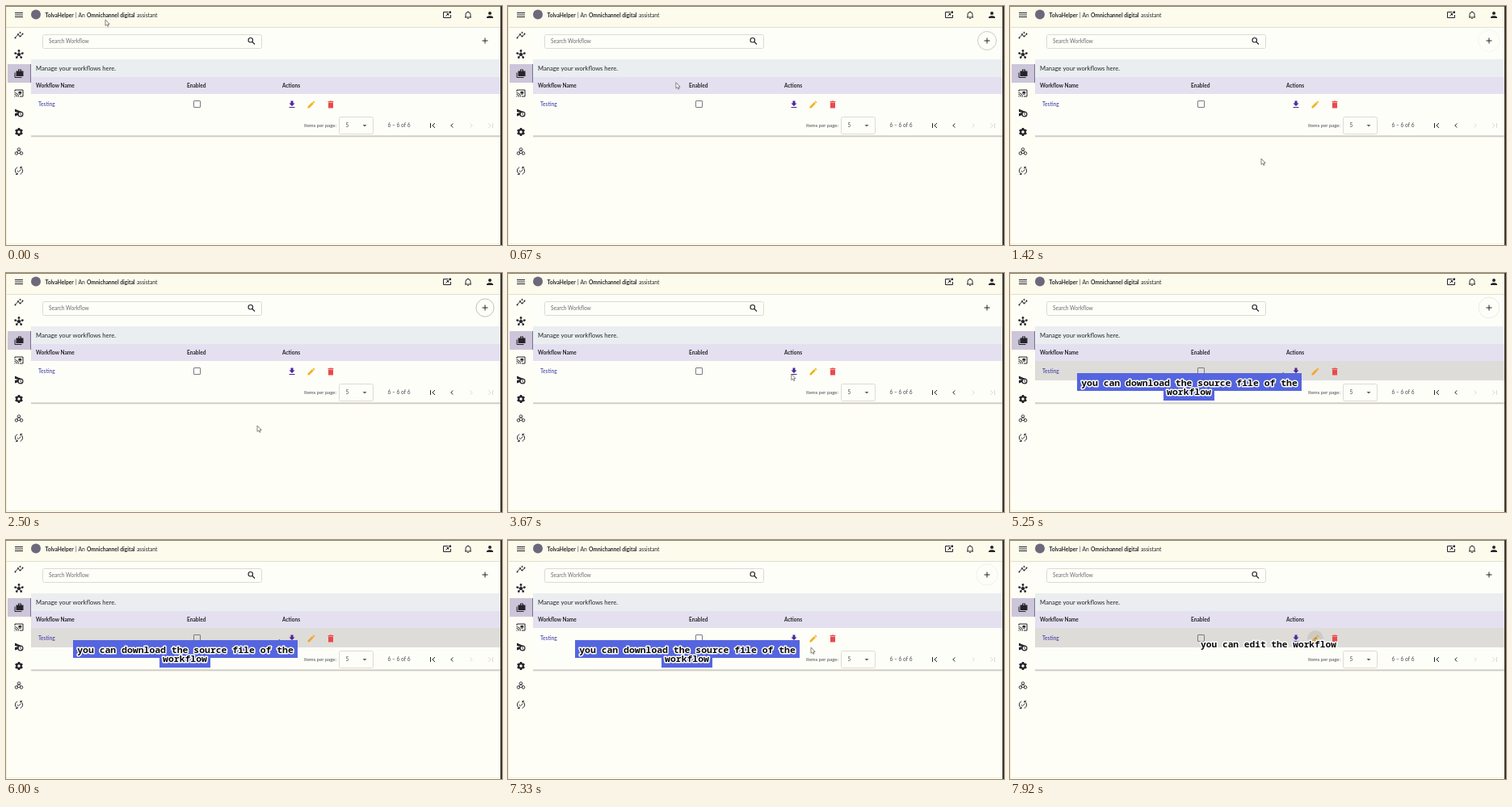
Animation, 614 px wide and 296 px high, one loop 8 s. Source, as an HTML page with a canvas:

```html
<!DOCTYPE html>
<html lang="en">
<head>
<meta charset="utf-8">
<title>Workflow list</title>
<style>
html, body { margin: 0; width: 100%; height: 100%; overflow: hidden; background: #fefef6; }
canvas { display: block; width: 614px; height: 296px; }
</style>
</head>
<body>
<canvas id="stage" width="614" height="296"></canvas>
<script>
const g = document.getElementById('stage').getContext('2d');
const LOOP = 8000;
const UI = 'Lato, sans-serif';
const MONO = '"Noto Sans Mono", "DejaVu Sans Mono", monospace';
const INK = '#25242a';
const EDGE = '#dcdad2';
const PAGE = '#fefef6';

function box(x, y, w, h, color) {
  g.fillStyle = color;
  g.fillRect(x, y, w, h);
}

function frame(x, y, w, h, color, r = 2) {
  g.strokeStyle = color;
  g.lineWidth = 1;
  g.beginPath();
  g.roundRect(x + 0.5, y + 0.5, w, h, r);
  g.stroke();
}

function label(str, x, y, size, color = INK, weight = 400) {
  g.font = `${weight} ${size}px ${UI}`;
  g.fillStyle = color;
  g.fillText(str, x, y);
}

// Icons live on a 24-unit grid centred on (x, y) and are 12px wide by default.
function icon(x, y, { fill, line, width = 2, color = INK, scale = 0.5 }) {
  g.save();
  g.translate(x - 12 * scale, y - 12 * scale);
  g.scale(scale, scale);
  g.fillStyle = g.strokeStyle = color;
  g.lineWidth = width;
  if (line) g.stroke(new Path2D(line));
  if (fill) g.fill(new Path2D(fill), 'evenodd');
  g.restore();
}

function dot(x, y, r, color = INK) {
  g.fillStyle = color;
  g.beginPath();
  g.arc(x, y, r, 0, Math.PI * 2);
  g.fill();
}

function ring(x, y, r, color = INK, width = 1, from = 0, to = Math.PI * 2) {
  g.strokeStyle = color;
  g.lineWidth = width;
  g.beginPath();
  g.arc(x, y, r, from, to);
  g.stroke();
}

function spokes(x, y, n, r, tip, turn) {
  for (let i = 0; i < n; i++) {
    const a = turn + i * Math.PI * 2 / n;
    const px = x + r * Math.cos(a), py = y + r * Math.sin(a);
    g.strokeStyle = INK;
    g.lineWidth = 0.9;
    g.beginPath();
    g.moveTo(x, y);
    g.lineTo(px, py);
    g.stroke();
    dot(px, py, tip);
  }
}

function gear(x, y) {
  g.strokeStyle = INK;
  g.lineWidth = 2.4;
  for (let i = 0; i < 3; i++) {
    const a = Math.PI / 2 + i * Math.PI / 3;
    const dx = 5 * Math.cos(a), dy = 5 * Math.sin(a);
    g.beginPath();
    g.moveTo(x - dx, y - dy);
    g.lineTo(x + dx, y + dy);
    g.stroke();
  }
  dot(x, y, 3.9);
  dot(x, y, 1.7, PAGE);
}

function sidebar() {
  box(2, 72, 29, 23, '#cdc6da');
  box(30, 72, 1, 23, '#77738a');

  icon(16, 36, { line: 'M3 18L10 11L15 16L21 10', fill: 'M15 3l1 2 2 1-2 1-1 2-1-2-2-1 2-1z' });
  for (const [x, y] of [[11.5, 39.6], [15, 35.1], [17.5, 37.6], [20.5, 34.6]]) dot(x, y, 1);

  spokes(16, 60, 5, 4.6, 1.35, -Math.PI / 2);
  dot(16, 60, 2.1);

  icon(16, 84, {
    fill: 'M5 5h5V1h8v4h5v13H5zM12 3v2h4V3z',
    line: 'M2 9v12h17'
  });

  icon(16, 108, {
    line: 'M2 8V4h20v16h-8M1 15a6 6 0 0 1 6 6M1 11a10 10 0 0 1 10 10',
    fill: 'M9 10l5.5-3 5.5 3-5.5 3zM11 12l3.5 2 3.5-2v2l-3.5 2-3.5-2zM1 18v3h3z'
  });

  icon(16, 132, { fill: 'M2 3l16 7-7 8-9 3v-7l9-2-9-2z' });
  dot(18, 134, 3.5);
  dot(18, 134, 2.3, PAGE);
  icon(16, 132, { line: 'M16 12v5l3 2', width: 1.6 });

  gear(16, 156);

  for (const [x, y] of [[16, 177.6], [13, 182.4], [19, 182.4]]) ring(x, y, 1.8, INK, 0.9);
  icon(16, 180, { line: 'M12 8l4 7M11 9l-4 7M8 17h8', width: 1.3 });

  ring(16, 204, 4.6, INK, 1, -0.7, 1.2);
  ring(16, 204, 4.6, INK, 1, 2.4, 4.3);
  icon(16, 204, {
    line: 'M8 12l3 3 6-6',
    fill: 'M15 2h6l-6 6zM9 22H3l6-6z',
    width: 1.8
  });
}

function header() {
  box(0, 0, 614, 27, '#fcfbec');
  box(0, 26, 614, 1, '#e2e0d0');
  icon(16, 11, { line: 'M2 7H22M2 12H22M2 17H22' });
  dot(37, 10.5, 6, '#6d697c');

  label('TolvaHelper', 48.5, 13.5, 6.6, INK, 700);
  label('| An', 86, 13.5, 6.7);
  label('Omnichannel digital', 100, 13.5, 6.7, INK, 700);
  label('assistant', 162, 13.5, 6.7);

  icon(546, 11, {
    line: 'M15 5H3V19H21V12M9 15l5-5',
    fill: 'M10 8h6v6zM17 3h5v5h-5z'
  });
  icon(572, 11, {
    line: 'M4 18H20M6 18V11a6 6 0 0 1 12 0v7M12 3v3',
    fill: 'M10 20h4a2 2 0 0 1-4 0z'
  });
  icon(599, 11, { fill: 'M8 8a4 4 0 1 1 8 0a4 4 0 1 1-8 0M4 20v-2c0-5 16-5 16 0v2z' });
}

function table(hover, editHover) {
  box(31, 27, 581, 134, '#fefef9');
  frame(45, 35, 271, 17, EDGE);
  label('Search Workflow', 53, 46, 6.6, '#6c6b70');
  icon(304, 43.5, { line: 'M4 9.5a5.5 5.5 0 1 1 11 0a5.5 5.5 0 1 1-11 0M14 14l6 6', width: 2.3 });

  box(31, 66, 581, 22, '#ebeef1');
  label('Manage your workflows here.', 37, 80, 7.6);
  box(31, 88, 581, 21, '#e4e0f0');
  label('Workflow Name', 37, 101, 6.5, INK, 700);
  label('Enabled', 224, 101, 6.6, INK, 700);
  label('Actions', 342, 101, 6.5, INK, 700);

  if (hover) box(31, 109, 581, 24, '#dedcd8');
  if (editHover) dot(378, 122, 10, 'rgba(90,85,70,0.12)');
  label('Testing', 40, 123.5, 6.6, '#3434a4');
  frame(232, 117, 8, 8, '#7c7a80', 0.5);

  icon(354, 122, { fill: 'M9 3h6v6h4l-7 7-7-7h4zM5 18h14v2H5z', color: '#48269a' });
  icon(378, 122, {
    fill: 'M3 17.2V21h3.8L17.8 9.9l-3.7-3.7zM15.2 5.1l2.1-2.1 3.7 3.7-2.1 2.1z',
    color: hover ? '#f3a52c' : '#efb51f'
  });
  icon(402, 122, { fill: 'M6 7h12v14H6zM5 4h4l1-1h4l1 1h4v2H5z', color: '#e94a4c' });

  label('Items per page:', 369, 150, 5.95, '#4a494e');
  frame(412, 137, 42, 21, EDGE);
  label('5', 420.5, 150, 6.6, '#4a494e');
  icon(444, 148, { fill: 'M7 10h10l-5 5z', color: '#65636a' });
  label('6 – 6 of 6', 472.5, 150, 6.6, '#4a494e');

  const pale = '#dddbd0';
  icon(528, 148, { line: 'M7 6v12M18 6l-6 6 6 6' });
  icon(552, 148, { line: 'M14.5 7l-5 5 5 5' });
  icon(576, 148, { line: 'M9.5 7l5 5-5 5', color: pale });
  icon(600, 148, { line: 'M17 6v12M6 6l6 6-6 6', color: pale });

  box(31, 160, 581, 1, '#dddbd2');
  box(31, 161, 581, 1, '#cfcdc8');
  box(31, 162, 581, 1, '#f2f1e8');
}

// Add button with a ring that spreads and fades every two seconds.
function addButton(t) {
  const p = (t % 2000) / 2000;
  const alpha = p < 0.08 ? 0 : Math.max(0, 0.75 * (1 - p / 0.8));
  if (alpha) ring(593, 43, 9.8 + 5 * p, `rgba(140,137,110,${alpha})`, 1);
  icon(593, 43, { line: 'M12 5V19M5 12H19' });
}

const path = [
  [0, 123, 17], [250, 123, 17], [1150, 311, 189], [2550, 311, 189],
  [3350, 351, 125], [4500, 350, 126], [5000, 338, 123], [6500, 338, 123],
  [7150, 375, 133], [7500, 375, 133], [7700, 378, 121], [8000, 378, 121]
];

function pointerAt(t) {
  const i = path.findIndex(k => k[0] > t);
  const [t0, x0, y0] = path[i - 1], [t1, x1, y1] = path[i];
  const p = (t - t0) / (t1 - t0), e = p * p * (3 - 2 * p);
  return [x0 + (x1 - x0) * e, y0 + (y1 - y0) * e];
}

function pointer(t) {
  const [x, y] = pointerAt(t);
  g.save();
  g.translate(x, y);
  const arrow = new Path2D('M0 0V7.4L1.7 5.9L2.9 8.4L4.1 7.8L3 5.4H5.2Z');
  g.fillStyle = '#fffffa';
  g.strokeStyle = '#69675f';
  g.lineWidth = 0.8;
  g.fill(arrow);
  g.stroke(arrow);
  g.restore();
}

function captionLine(str, x, y, size) {
  g.save();
  g.font = `700 ${size}px ${MONO}`;
  g.textAlign = 'center';
  g.lineJoin = 'round';
  g.lineWidth = 3;
  g.strokeStyle = '#fff';
  g.strokeText(str, x, y);
  g.fillStyle = '#0b0b0b';
  g.fillText(str, x, y);
  g.restore();
}

function caption(t) {
  if (t >= 4250 && t < 7660) {
    box(83, 124, 278, 22, '#5565e0');
    box(190, 140, 63, 18, '#5565e0');
    captionLine('you can download the source file of the', 222, 139.5, 11.45);
    captionLine('workflow', 221.5, 151, 11.45);
  } else if (t >= 7660) {
    captionLine('you can edit the workflow', 320, 132.5, 11.2);
  }
}

function draw(t) {
  box(0, 0, 614, 296, PAGE);
  header();
  sidebar();
  table((t >= 4750 && t < 6850) || t >= 7600, t >= 7660);
  addButton(t);
  pointer(t);
  caption(t);
  box(0, 0, 614, 1, '#85826c');
  box(0, 1, 1, 295, '#eeecd0');
  box(1, 294, 611, 1, '#f3f2dc');
  box(612, 0, 2, 296, '#39382f');
}

const start = performance.now();
function tick() {
  draw((performance.now() - start) % LOOP);
  requestAnimationFrame(tick);
}
tick();
</script>
</body>
</html>
```
